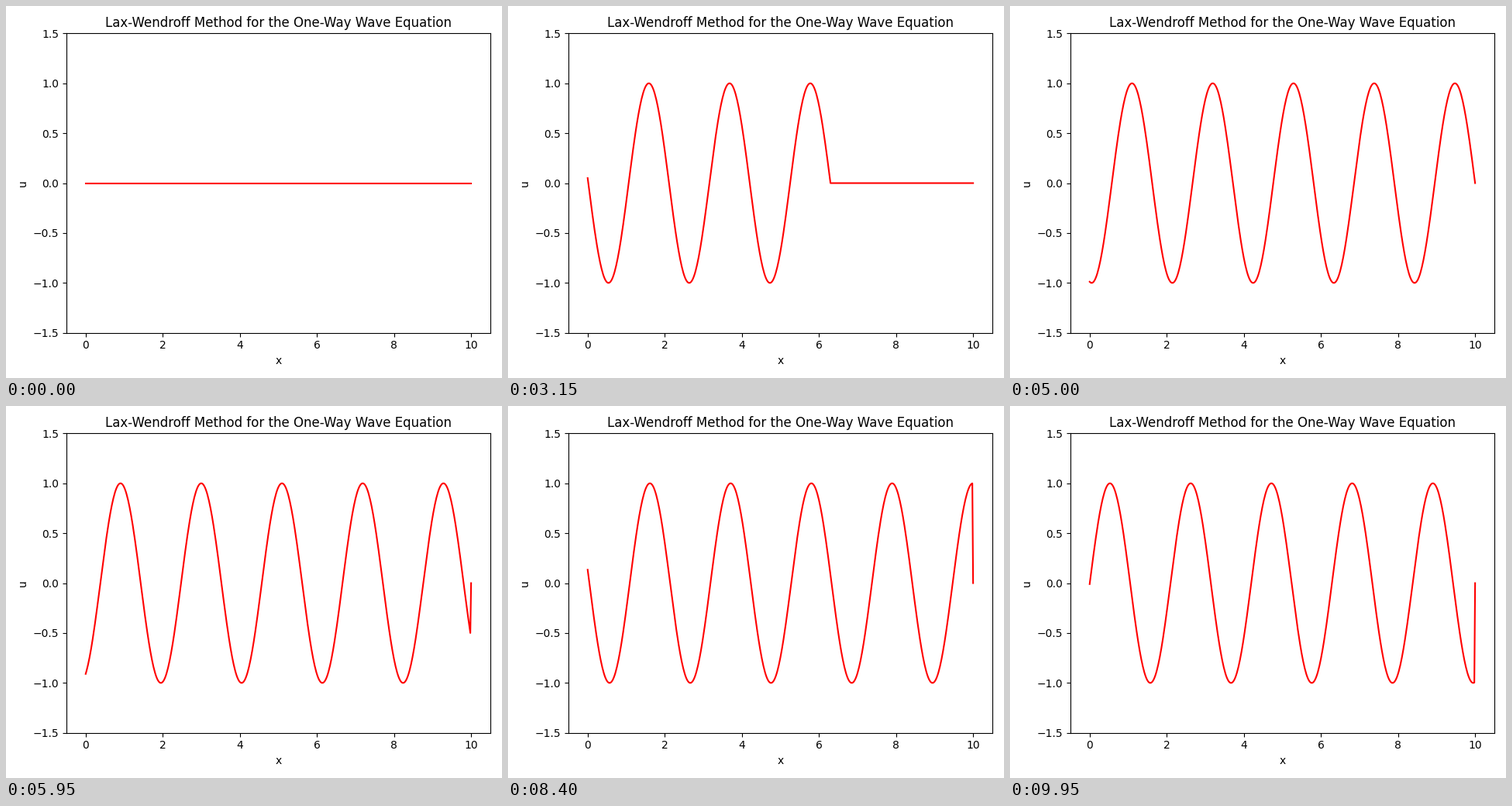
Write a matplotlib script that moves like this. It is 640 px wide and 480 px high and loops after 10 s.

```python
import numpy as np
import matplotlib.pyplot as plt
from matplotlib.animation import FuncAnimation

FRAMES = 200
INTERVAL = 50       # ms
LENGTH = 10.0
CELLS = 500
STEP = 0.1          # simulated time per frame
OMEGA = 3.0         # angular frequency of the driven left end

x = np.linspace(0, LENGTH, CELLS + 1)


def wave(t):
    """At unit Courant number the scheme shifts the inflow signal exactly."""
    u = np.where(x < t, np.sin(OMEGA * (t - x)), 0.0)
    u[-1] = 0.0     # fixed right end
    return u


fig, ax = plt.subplots(figsize=(6.4, 4.8), dpi=100)
line, = ax.plot(x, wave(0), color="red", lw=1.5)
ax.set_xlim(-0.5, 10.5)
ax.set_ylim(-1.5, 1.5)
ax.set_xlabel("x")
ax.set_ylabel("u")
ax.set_title("Lax-Wendroff Method for the One-Way Wave Equation")
fig.tight_layout()
fig.subplots_adjust(top=0.9264)


def update(frame):
    line.set_ydata(wave(frame * STEP))
    return line,


anim = FuncAnimation(fig, update, frames=FRAMES, interval=INTERVAL,
                     repeat=True, repeat_delay=0)
plt.show()
```
